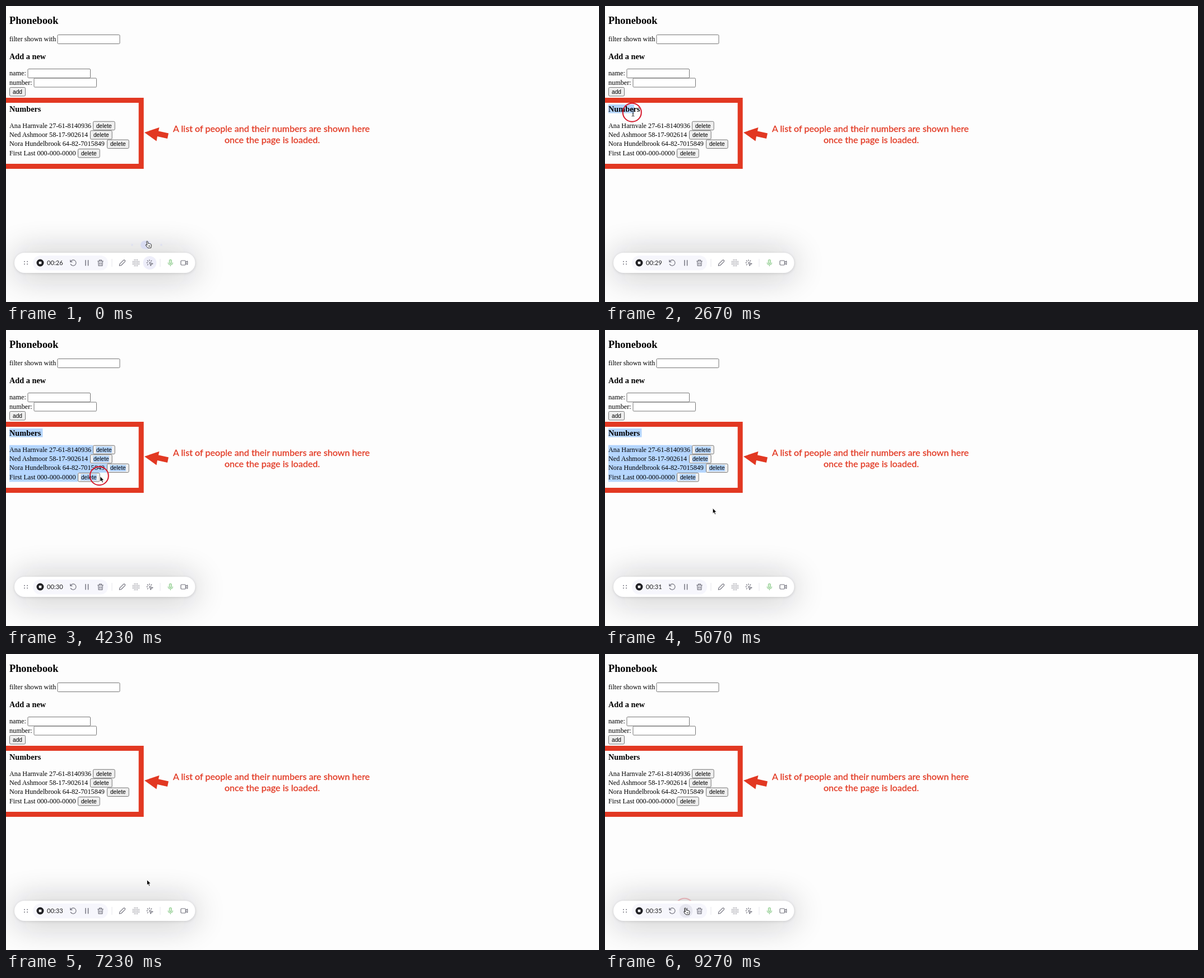
An HTML page for the animation above (9.31 s loop, 1058x529 px).

```html
<!DOCTYPE html>
<html lang="en">
<head>
<meta charset="utf-8">
<title>Phonebook</title>
<style>
  html, body { margin: 0; width: 100%; height: 100%; overflow: hidden; background: #fdfdfd; }
  svg { display: block; width: 100%; height: 100%; }
  text { white-space: pre; }
  .page { font: 12.2px "Liberation Serif", "Times New Roman", serif; }
  .h2 { font-size: 18.3px; font-weight: bold; }
  .h3 { font-size: 14.3px; font-weight: bold; }
  .label { font: 10.2px "Liberation Sans", Arial, sans-serif; text-anchor: middle; }
  .field { fill: #fff; stroke: #767676; }
  .button { fill: #efefef; stroke: #767676; }
  .sel { fill: #b4d5fe; }
  .callout { font: 16px Lato, sans-serif; letter-spacing: .06px; fill: #e23822; stroke: #e23822; stroke-width: .3px; text-anchor: middle; }
  .icons { fill: none; stroke: #74747f; stroke-width: 1.2; stroke-linecap: round; stroke-linejoin: round; }
  #timer { font: 11.2px Lato, sans-serif; fill: #222; }
</style>
</head>
<body>
<svg viewBox="0 0 1058 529" preserveAspectRatio="none">
  <defs>
    <filter id="soft" filterUnits="userSpaceOnUse" x="-150" y="300" width="650" height="330">
      <feGaussianBlur stdDeviation="30"/>
    </filter>
    <filter id="near" filterUnits="userSpaceOnUse" x="0" y="420" width="360" height="80">
      <feGaussianBlur stdDeviation="2.5"/>
    </filter>
  </defs>
  <rect width="1058" height="529" fill="#fdfdfd"/>
  <rect x="15" y="444" width="323" height="36" rx="18" fill="#15151c" opacity=".3" filter="url(#soft)"/>

  <g class="page">
    <g id="rows"></g>
    <text class="h2" x="6" y="31.5">Phonebook</text>
    <text x="6" y="63">filter shown with</text>
    <text class="h3" x="6" y="94.5">Add a new</text>
    <text x="6" y="124">name:</text>
    <text x="6" y="140.5">number:</text>
    <text class="h3" x="6" y="188.5">Numbers</text>
    <g class="field">
      <rect x="92" y="51.5" width="111" height="16" rx="1.5"/>
      <rect x="39" y="112.5" width="111.5" height="16" rx="1.5"/>
      <rect x="50" y="129" width="111.5" height="16" rx="1.5"/>
    </g>
    <rect class="button" x="6.5" y="145.5" width="28" height="15.5" rx="2"/>
    <text class="label" x="20.5" y="157">add</text>
  </g>

  <path d="M-10 168.5H241.2V286.5H-10" fill="none" stroke="#e23822" stroke-width="9"/>
  <path d="M247 226L273.5 217L272 223.5L290 227.5L288 237L270 233L268.5 241.5Z" fill="#e23822"/>
  <text class="callout" x="473.5" y="225">A list of people and their numbers are shown here</text>
  <text class="callout" x="475" y="245">once the page is loaded.</text>

  <circle id="ring" r="16.5" fill="none" stroke="#d5182b" stroke-width="2"/>

  <g id="popup" fill="#d9dcf3">
    <rect x="240" y="419.5" width="19" height="15" rx="7.5"/>
    <circle cx="225" cy="427" r="2" opacity=".6"/>
    <circle cx="277" cy="427" r="2" opacity=".6"/>
  </g>

  <rect x="15" y="442" width="323" height="36" rx="18" opacity=".12" filter="url(#near)"/>
  <rect x="15" y="441" width="322.5" height="36" rx="18" fill="#fff"/>
  <rect x="48" y="446" width="134" height="26.5" rx="13.2" fill="#f6f6fc"/>
  <circle id="hoverClick" cx="256.5" cy="459" r="12" fill="#eeeefa"/>
  <circle id="hoverPause" cx="144.3" cy="459" r="12" fill="#e6e6ef"/>
  <path d="M189 452V466M275 452V466" stroke="#e6e6ec"/>
  <circle cx="61" cy="459" r="6.5" fill="#202024"/>
  <rect x="58.7" y="456.7" width="4.6" height="4.6" rx=".8" fill="#fff"/>
  <text id="timer" x="73" y="463"></text>

  <g class="icons">
    <path d="M33 456.7H38.2M33 461.3H38.2" stroke-width="2" stroke-dasharray="0 5.1"/>
    <path d="M114.8 454.2V457.4H118M115.2 457A5.1 5.1 0 1 1 115.4 461.4"/>
    <path d="M142 454.5V463.7M146.6 454.5V463.7" stroke-width="1.5"/>
    <path d="M163.6 456H173.4M166.4 456V454.2H170.6V456M164.7 456.2L165.2 464.2H171.8L172.3 456.2M167.2 458.6V461.8M169.8 458.6V461.8"/>
    <path d="M202.3 464.2L203 460.9L209.6 454.3Q211 453.4 212.1 454.5Q213.2 455.6 212.2 456.9L205.6 463.5Z"/>
    <path d="M229.2 453.8H234.8M226.7 456.4H237.3M226.7 459H237.3M226.7 461.6H237.3M229.2 464.2H234.8" stroke-width="1.5" stroke-dasharray="0 2.62"/>
    <path d="M256 453.6V455.4M252.4 455L253.5 456.3M251 458.8H252.8M259.8 455L258.6 456.3M252.4 462.8L253.5 461.6M256 458.4L262 460.5L259.4 461.6L258.2 464.2Z"/>
    <g stroke="#9bd19b">
      <rect x="291.4" y="453.4" width="4" height="7" rx="2" fill="#d5efd2"/>
      <path d="M289.2 458.8Q289.4 462.4 293.4 462.4T297.6 458.8M293.4 462.5V464.7"/>
    </g>
    <path d="M313.4 455H319Q320.4 455 320.4 456.4V461.6Q320.4 463 319 463H313.4Q312 463 312 461.6V456.4Q312 455 313.4 455ZM320.6 458L323.8 456V462L320.6 460Z"/>
  </g>

  <g id="cursor">
    <path id="arrow" d="M0 0V9.6L2.2 7.6L3.8 11.2L5.4 10.5L3.9 7H6.8Z" fill="#000" stroke="#fff" stroke-width=".8"/>
    <path id="beam" d="M-2.3 -6Q0 -6 0 -4.7Q0 -6 2.3 -6M0 -4.7V4.7M-2.3 6Q0 6 0 4.7Q0 6 2.3 6M-1.2 1.8H1.2" fill="none" stroke="#222" stroke-width="1"/>
    <path id="hand" d="M-1.3 .9Q-1.2 -.2 -.2 -.2Q.7 -.1 .9 .9L1.8 4.2Q2.8 3.4 3.6 4.4Q4.8 3.7 5.4 4.8Q7 4.5 7.3 6.2Q7.7 8.7 6.6 11.8H1Q-.8 9.6 -2.7 7.2Q-3 5.8 -1.6 6L-.1 7ZM2.8 7.4V9.6M4.6 7.4V9.6" fill="#fff" stroke="#222" stroke-width="1"/>
  </g>
</svg>
<script>
const LOOP = 9310;
const $ = id => document.getElementById(id);

const people = [
  ["Ana Harnvale 27-61-8140936", 155],
  ["Ned Ashmoor 58-17-902614", 150],
  ["Nora Hundelbrook 64-82-7015849", 180],
  ["First Last 000-000-0000", 128]
];

function add(parent, tag, attrs, content = "") {
  const node = document.createElementNS("http://www.w3.org/2000/svg", tag);
  for (const key in attrs) node.setAttribute(key, attrs[key]);
  node.textContent = content;
  parent.append(node);
  return node;
}

const rows = $("rows");
const lines = [{
  bar: add(rows, "rect", { class: "sel", x: 6, y: 176, height: 15.5 }),
  top: 0, bottom: 199, end: 65.5
}];
people.forEach(([entry, x], i) => {
  const y = 206 + i * 16.4;
  const bar = add(rows, "rect", { class: "sel", x: 6, y: y - .3, height: 16.4 });
  add(rows, "text", { x: 6, y: y + 11.6 }, entry);
  add(rows, "rect", { class: "button", x: x + .5, y: y + .3, width: 38.7, height: 15.4, rx: 2 });
  const mark = add(rows, "rect", { class: "sel", x: x + 5.5, y: y + 2.2, width: 28.5, height: 11.6 });
  add(rows, "text", { class: "label", x: x + 19.8, y: y + 11.6 }, "delete");
  lines.push({ bar, mark, top: y - .3, bottom: y + 16.1, end: x });
});

// Pointer hotspot: time, x, y
const path = [
  [0, 252, 420.5], [180, 252, 420.5], [960, 24, 182], [1250, 24, 182], [1700, 7, 184],
  [1900, 7, 184], [2670, 50, 191], [2850, 54, 191], [3750, 165, 260], [4200, 168, 261.5],
  [4700, 168, 261.5], [5600, 233.5, 415.5], [6200, 234, 415.5], [6900, 251.5, 403.5],
  [7700, 251.5, 403.5], [8700, 143.5, 454], [LOOP, 143.5, 454]
];
const shapes = [[0, "hand"], [220, "arrow"], [850, "beam"], [3650, "arrow"], [8560, "hand"]];
const presses = [[1780, 4560], [6330, 6430], [9000, 9050]];
const [dragStart, dragEnd] = presses[0];
const clearTime = presses[1][0];

const clamp = v => Math.max(0, Math.min(1, v));

function pointAt(t) {
  const i = path.findIndex(p => p[0] > t);
  const [t0, x0, y0] = path[i - 1], [t1, x1, y1] = path[i];
  const u = (t - t0) / (t1 - t0), k = u * u * (3 - 2 * u);
  return [x0 + (x1 - x0) * k, y0 + (y1 - y0) * k];
}

function select(t) {
  const active = t >= dragStart && t < clearTime;
  const [x, y] = pointAt(Math.min(t, dragEnd));
  for (const { bar, mark, top, bottom, end } of lines) {
    const reach = !active || y < top ? 0 : y >= bottom ? 999 : x + 2;
    bar.setAttribute("width", Math.max(0, Math.min(reach, end) - 6));
    if (mark) mark.setAttribute("opacity", reach > end + 20 ? 1 : 0);
  }
}

function draw(t) {
  const [x, y] = pointAt(t);
  $("cursor").setAttribute("transform", `translate(${x} ${y})`);
  const shape = shapes.filter(s => s[0] <= t).pop()[1];
  for (const id of ["arrow", "beam", "hand"]) $(id).setAttribute("opacity", id === shape ? 1 : 0);

  const ringAlpha = presses.map(([a, b]) => Math.min(clamp((t - a) / 80), clamp(1 - (t - b) / 300)));
  $("ring").setAttribute("opacity", Math.max(...ringAlpha));
  $("ring").setAttribute("transform", `translate(${x - 1.7} ${y - .8})`);

  $("popup").setAttribute("opacity", clamp(1 - t / 120));
  $("hoverClick").setAttribute("opacity", clamp(1 - t / 200));
  $("hoverPause").setAttribute("opacity", clamp((t - 8600) / 120));
  $("timer").textContent = "00:" + (26 + Math.floor((t + 530) / 1000));
  select(t);
}

const start = performance.now();
function tick() {
  draw((performance.now() - start) % LOOP);
  requestAnimationFrame(tick);
}
tick();
</script>
</body>
</html>
```
